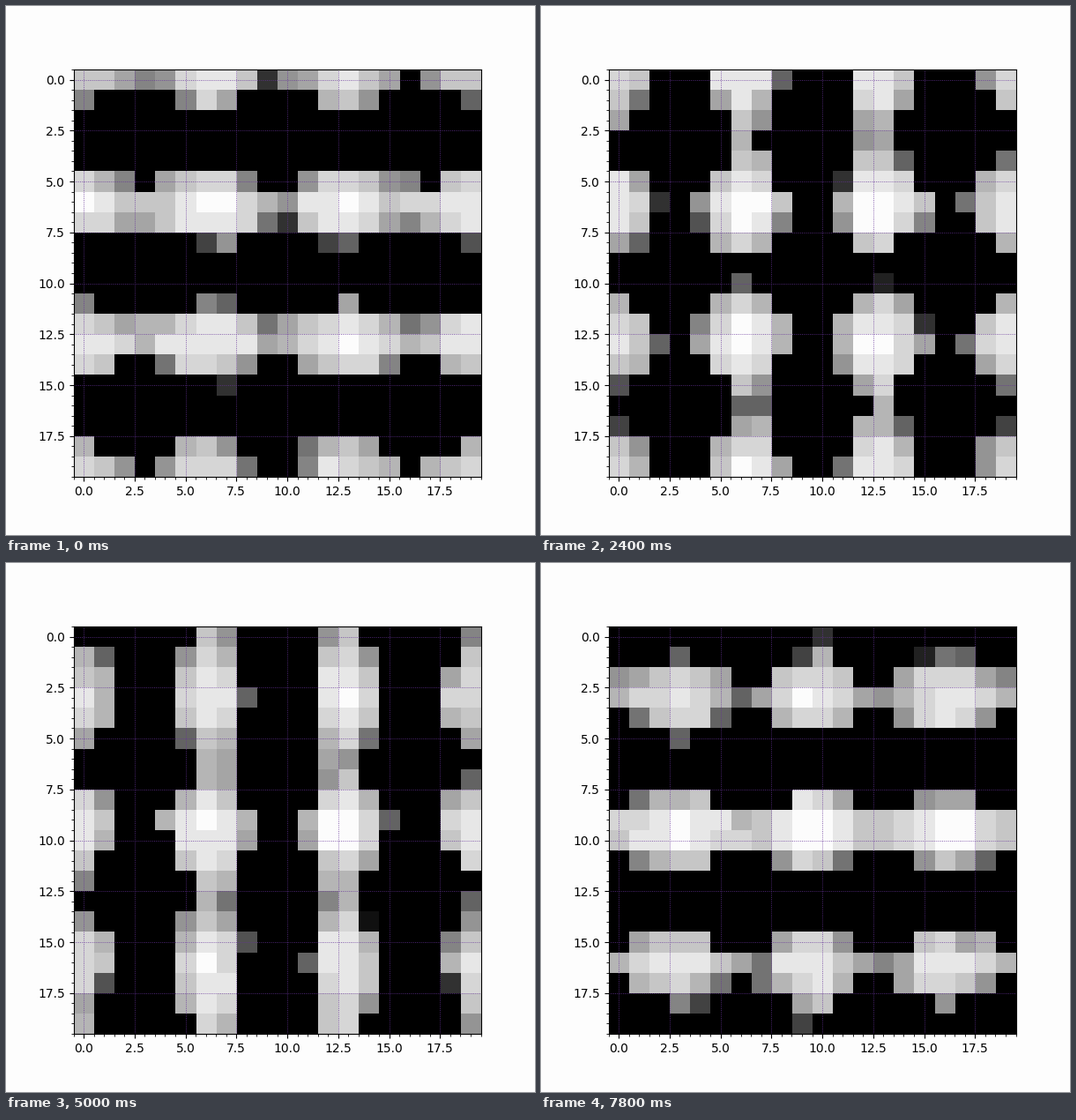
A matplotlib script that plays this animation: 600 px wide and 600 px high, repeating every 8 s.

```python
import numpy as np
import matplotlib.pyplot as plt
from matplotlib.animation import FuncAnimation
from matplotlib.colors import ListedColormap

N = 20
FRAMES = 40
STEP_MS = 200

# Phase of each standing wave, in cycles, at a few moments
KEYS = [0, 7, 12, 20, 25, 33, 39]
PHASE_X = [-2.17, -1.57, -1.05, -0.48, 0.03, 0.80, 1.335]
PHASE_Y = [0.0, 0.645, 1.125, 1.863, 2.333, 3.03, 3.55]

OFFSET = -0.15
NOISE = 0.11
PEAK = 1.5
LOG_RANGE = 5.5

GRAYS = np.append(np.linspace(0, 0.906, 15), 0.992)
CMAP = ListedColormap([(g, g, g) for g in GRAYS])


def wave_profile():
    cell = np.arange(N)
    dist = np.abs(cell - (N - 1) / 2)
    return 1.3 * np.exp(-dist / 14) * np.cos(6 * np.pi * (cell + 0.5) / N)


def swing(frame, phases):
    return np.cos(2 * np.pi * np.interp(frame, KEYS, phases))


def field(frame):
    """Two crossed standing waves with noise, on a log brightness scale."""
    wave = wave_profile()
    u = swing(frame, PHASE_X) * wave[None, :] + swing(frame, PHASE_Y) * wave[:, None]
    rng = np.random.default_rng(100 + frame)
    u = u + OFFSET + rng.normal(0, NOISE, (N, N))
    level = 1 + np.log(np.maximum(u, 1e-6) / PEAK) / LOG_RANGE
    return np.round(15 * np.clip(level, 0, 1)) / 15


fig, ax = plt.subplots(figsize=(6, 6), dpi=100, facecolor="#fdfdfd")
image = ax.imshow(field(0), cmap=CMAP, vmin=0, vmax=1, interpolation="nearest")
ax.minorticks_on()
ax.grid(which="major", color="rebeccapurple", linestyle=":", linewidth=0.6)


def update(frame):
    image.set_data(field(frame))
    return [image]


anim = FuncAnimation(fig, update, frames=FRAMES, interval=STEP_MS, repeat=True)
plt.show()
```
